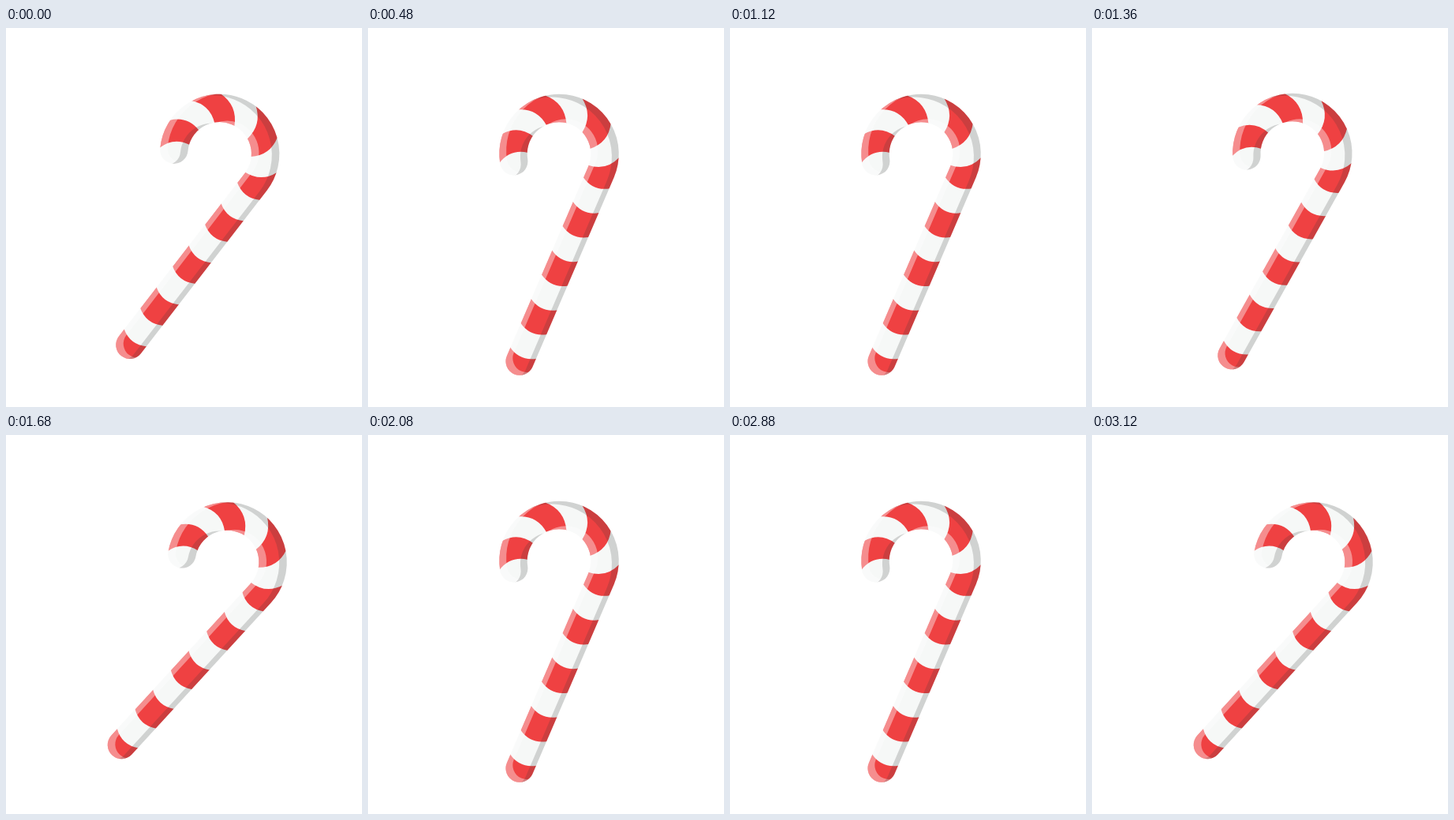
An HTML page that plays this animation: 451 by 480 pixels, repeating every 3.2 s.

```html
<!DOCTYPE html>
<html lang="en">
<head>
<meta charset="utf-8">
<title>Candy cane</title>
<style>
html, body { margin: 0; width: 100%; height: 100%; overflow: hidden; background: #fff; }
svg { display: block; width: 451px; height: 480px; }
.cane { fill: none; stroke-width: 35.4; stroke-linecap: round; }
</style>
</head>
<body>
<svg viewBox="0 0 451 480">
  <defs>
    <!-- Local origin: centre of the hook, shaft pointing straight down -->
    <path id="shape" class="cane" d="M58 261V0A58 58 0 1 0 -48.9 31.2"/>
    <mask id="body" maskUnits="userSpaceOnUse" x="-100" y="-100" width="200" height="420">
      <use href="#shape" stroke="#fff"/>
    </mask>
    <mask id="lit" maskUnits="userSpaceOnUse" x="-100" y="-100" width="200" height="420">
      <use href="#shape" stroke="#fff"/>
      <use href="#shape" stroke="#000" transform="translate(6.6 -7)"/>
    </mask>
    <mask id="shade" maskUnits="userSpaceOnUse" x="-100" y="-100" width="200" height="420">
      <use href="#shape" stroke="#fff"/>
      <use href="#shape" stroke="#000" transform="translate(-6.6 7)"/>
    </mask>
  </defs>
  <g id="cane">
    <use href="#shape" stroke="#f6f8f7"/>
    <g mask="url(#body)"><path id="stripes" fill="#ef4142"/></g>
    <rect x="-100" y="-100" width="200" height="420" fill="#fff" opacity=".4" mask="url(#lit)"/>
    <rect x="-100" y="-100" width="200" height="420" fill="#333" opacity=".19" mask="url(#shade)"/>
  </g>
</svg>
<script>
const INNER = 39.5, OUTER = 76.5;
const STEP = 80, LOOP = 3200, SWING = 400;
const START = 37.7, MIDDLE = 32.9, AMP = 11.9;

const polar = (r, deg) => [r * Math.cos(deg * Math.PI / 180), r * Math.sin(deg * Math.PI / 180)];

// Curve from p to q, its control point pushed right of travel by k chord lengths
function bow(p, q, k) {
  const cx = (p[0] + q[0]) / 2 - k * (q[1] - p[1]);
  const cy = (p[1] + q[1]) / 2 + k * (q[0] - p[0]);
  return `Q${cx} ${cy} ${q[0]} ${q[1]}`;
}

// Stripe edges from the hook's end to the foot: outer and inner angle, then heights
const edges = [[-212, -201], [-184, -169], [-156, -137], [-127, -99.5],
               [-91, -66], [-54, -32.5], [-20, -2]]
  .map(([o, i]) => ({ out: polar(OUTER, o), in: polar(INNER, i) }));
const addLevel = y => edges.push({ out: [OUTER, y], in: [INNER, y] });
for (let k = 0; k < 8; k++) addLevel(14.8 + 33.5 * k);
addLevel(300);

let d = "";
for (let i = 0; i < edges.length; i += 2) {
  const a = edges[i], b = edges[i + 1];
  d += `M${a.in}` + bow(a.in, a.out, .32) + bow(a.out, b.out, -.3) + bow(b.out, b.in, -.32) + "Z";
}
document.getElementById("stripes").setAttribute("d", d);

// First swing leaves the resting tilt, then a steady sway
function tilt(t) {
  const c = Math.cos(Math.PI * t / SWING), low = MIDDLE - AMP;
  return t < SWING ? low + (START - low) * (1 + c) / 2 : MIDDLE + AMP * c;
}

const cane = document.getElementById("cane");
const begin = performance.now();
function draw() {
  const t = Math.floor(((performance.now() - begin) % LOOP) / STEP) * STEP;
  cane.setAttribute("transform", `translate(256.6 272.4) rotate(${tilt(t)}) translate(-58 -98)`);
  requestAnimationFrame(draw);
}
draw();
</script>
</body>
</html>
```
